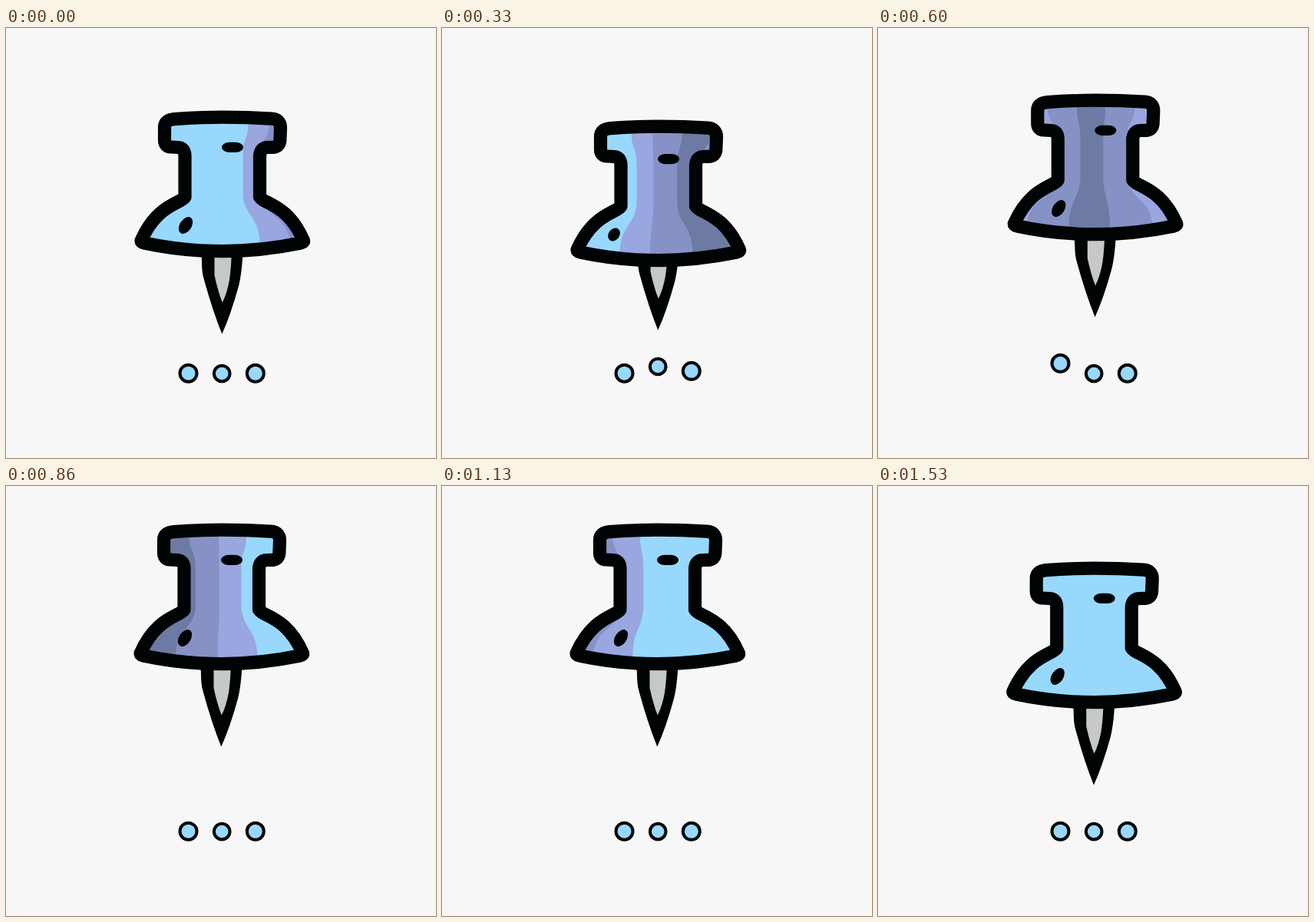
Recreate the animation shown at these times as an HTML page. Size 560 by 560 pixels, loop 1.6 s.

```html
<!DOCTYPE html>
<html lang="en">
<head>
<meta charset="utf-8">
<title>Push pin</title>
<style>
  html, body { margin: 0; width: 100%; height: 100%; overflow: hidden; background: #f7f7f7; }
  svg { display: block; width: 100%; height: 100%; }
</style>
</head>
<body>
<svg viewBox="0 0 560 560">
  <defs>
    <path id="shape" d="M206.5 129Q206.5 119.8 219 118.6Q250 116.3 282 116.1Q316 116.2 346 118.2
      Q357.5 119 357.5 130L356.8 147Q356 155 347 155.3L340 155.5Q331 156 330.5 167L330.5 220
      C335 229 367 229 387.5 277Q388 279 384 280Q332 290.7 282 290.7Q230 290.7 180 280Q176 279 176 277
      C197 229 228 229 233 220L233 167Q233 156 224 155.5L215 155Q206.5 154.5 206.5 146Z"/>
    <clipPath id="inside"><use href="#shape"/></clipPath>
  </defs>
  <g id="needle">
    <path fill="#010404" d="M254 280L255 305Q255 319 258 328Q269 368 281.3 398.5Q292.5 374 303 336Q308 316 309 280Z"/>
    <path fill="#c7c8c8" d="M271.5 285V322Q276 343 281.8 357.5Q288 345 291 328Q293.5 312 294 285Z"/>
  </g>
  <g id="body">
    <g id="shade" clip-path="url(#inside)">
      <rect x="160" y="100" width="250" height="200" fill="#98d8fd"/>
    </g>
    <use href="#shape" fill="none" stroke="#010404" stroke-width="17.2" stroke-linejoin="round"/>
    <rect id="dash" x="281" y="148.7" width="28" height="13.2" rx="10" ry="6.6" fill="#010404"/>
    <ellipse id="spot" rx="7.6" ry="12" fill="#010404"/>
  </g>
  <g id="dots" fill="#98d8fd" stroke="#010404" stroke-width="4">
    <circle cx="237.5" cy="449.7" r="11"/>
    <circle cx="281.2" cy="450" r="10.3"/>
    <circle cx="324.8" cy="449.8" r="11"/>
  </g>
</svg>
<script>
const LOOP = 1600, STEPS = 24, CENTER = 281;
const $ = id => document.getElementById(id);

// Key poses of the body: step, x, y
const poses = [
  [0, 0, 0], [3, 0, 13], [5, 0, 12], [7, .6, 0], [9, 1.3, -22],
  [13, -1, -59], [15, -1, -81], [17, -1, -59], [20, -1, -36], [24, 0, 0]
];

// Shade bands of the turning body: colour and the step at which its edge crosses the middle
const LIGHT = '#98d8fd', LAV = '#9aa6df', MID = '#8692c5', DARK = '#6d7aa3';
const SPEED = 11, TOP = 1.25, FOOT = 1.8;
const bands = [[LAV, 2.5], [MID, 4.5], [DARK, 7.3], [MID, 10], [LAV, 12.8], [LIGHT, 15.4]]
  .map(([fill, cross]) => {
    const path = document.createElementNS('http://www.w3.org/2000/svg', 'path');
    path.setAttribute('fill', fill);
    $('shade').append(path);
    return { path, cross };
  });
const dots = [...$('dots').children];

function poseAt(s) {
  const i = poses.findIndex(p => p[0] > s);
  const [t0, x0, y0] = poses[i - 1], [t1, x1, y1] = poses[i];
  const p = (s - t0) / (t1 - t0);
  return [x0 + (x1 - x0) * p, y0 + (y1 - y0) * p];
}

const move = (el, x, y, more = '') => el.setAttribute('transform', `translate(${x} ${y})${more}`);

function draw(s) {
  const [x, y] = poseAt(s);
  const press = Math.max(0, y) / 12;
  move($('body'), x, y);
  // The needle rises slowly until the body lifts it
  move($('needle'), x, s < 9 ? Math.min(y, -s) : y);
  move($('dash'), 0, press * 3.3);
  move($('spot'), 234 - 10 * press, 257, ` rotate(${33 + 4 * press}) scale(${1 - .06 * press} ${1 - .24 * press})`);

  for (const { path, cross } of bands) {
    const u = (cross - s) * SPEED;
    const top = CENTER + u * TOP, neck = CENTER + u, foot = CENTER + u * FOOT;
    path.setAttribute('d', `M${top} 100V124C${top} 146 ${neck} 142 ${neck} 168V213` +
      `C${neck} 246 ${foot} 242 ${foot} 284V300H900V100Z`);
  }

  dots.forEach((dot, i) => {
    const d = Math.min(1, Math.abs(s - 8.85 + 2.85 * i) / 2.7);
    move(dot, 0, -13 * Math.cos(d * Math.PI / 2) ** 2);
  });
}

// 15 steps per second, starting on whole hundredths
const start = performance.now();
function tick() {
  const n = Math.floor((performance.now() - start) % LOOP / 10);
  draw(Math.min(STEPS - 1, Math.ceil((n + 1) * 3 / 20) - 1));
  requestAnimationFrame(tick);
}
tick();
</script>
</body>
</html>
```
